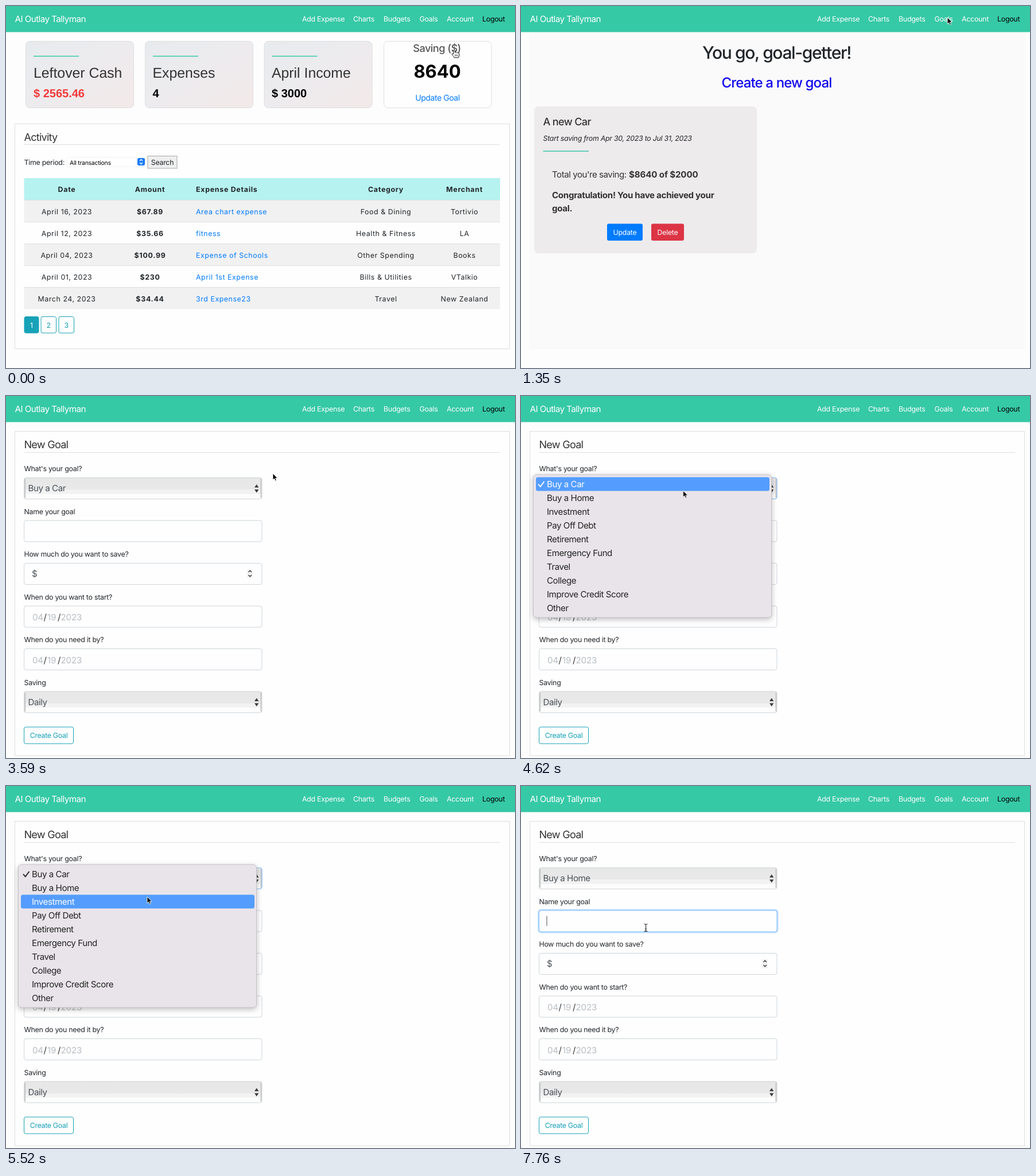
These frames come from a looping animation (887x631 px, 8000 ms). An HTML page:

```html
<!DOCTYPE html>
<html lang="en">
<head>
<meta charset="utf-8">
<title>Expense dashboard</title>
<style>
html, body { margin: 0; width: 100%; height: 100%; overflow: hidden; background: #fdfdfd; }
svg { display: block; width: 887px; height: 631px; }
text {
  font: 12.4px Inter, "Noto Sans", sans-serif; font-optical-sizing: none;
  letter-spacing: -.022em; fill: #212529; text-rendering: geometricPrecision; white-space: pre;
}
.m { text-anchor: middle; }
.white text, text.white { fill: #fff; }
text.brand { font-size: 15.2px; letter-spacing: -.036em; }
text.head { font-size: 18.1px; letter-spacing: -.042em; fill: #333; }
text.title { font-size: 30px; font-weight: 500; letter-spacing: -.045em; }
text.link { font-size: 24px; font-weight: 500; letter-spacing: -.036em; fill: #1106ee; }
text.big { font: 24.8px "Liberation Sans", Arial, sans-serif; letter-spacing: 0; fill: #333; }
text.sum { font: bold 20px "Liberation Sans", Arial, sans-serif; letter-spacing: 0; fill: #000; }
.table text { letter-spacing: .55px; }
.table .b { font-weight: 700; letter-spacing: .72px; }
.table .a { fill: #007bff; }
text.teal { fill: #17a2b8; }
text.lead { font-size: 15.1px; letter-spacing: -.031em; fill: #333; }
text.strong { font-weight: 700; letter-spacing: -.02em; }
.field { fill: #fefefe; stroke: #ced4da; }
.pick text { font-size: 15.1px; letter-spacing: -.029em; fill: #495057; }
text.date { font-size: 15.1px; letter-spacing: -.01em; fill: #b8bdc3; }
.date .s { fill: #333; }
.menu text { font-size: 15.1px; letter-spacing: -.029em; fill: #222; }
.menu .lit text { fill: #fff; }
.menu .lit rect { fill: #549dfe; }
.panel { fill: #fefefe; stroke: #dedede; }
.rule { stroke: #dedfe0; }
.mark { stroke: #34c9a5; stroke-width: 1.6; }

/* One 8 s timeline shared by every part */
.t { opacity: 0; animation: 8s step-end -2ms infinite; }
.home { animation-name: home; }
.goals { animation-name: goals; }
.form { animation-name: form; }
.back { animation-name: back; }
.front { animation-name: front; }
.under { animation-name: under; }
.focus { animation-name: focus; }
.menu { animation-name: menu; }
.car { animation-name: car; }
.house { animation-name: house; }
.invest { animation-name: invest; }
.before { animation-name: before; }
.after { animation-name: after; }
.ring { animation-name: ring; }
.arrow { animation-name: arrow; }
.hand { animation-name: hand; }
.beam { animation-name: beam; }
@keyframes home { 0% { opacity: 1 } 16.875%, to { opacity: 0 } }
@keyframes goals { 0% { opacity: 0 } 16.875% { opacity: 1 } 44.875%, to { opacity: 0 } }
@keyframes form { 0% { opacity: 0 } 44.875%, to { opacity: 1 } }
@keyframes back { 0% { opacity: 1 } 3.75% { opacity: .5 } 5.625%, to { opacity: 0 } }
@keyframes front { 0% { opacity: 0 } 3.75% { opacity: .5 } 5.625%, to { opacity: 1 } }
@keyframes under { 0% { opacity: 0 } 41.125%, to { opacity: 1 } }
@keyframes focus { 0% { opacity: 0 } 55.9375% { opacity: 1 } 95.125%, to { opacity: 0 } }
@keyframes menu { 0% { opacity: 0 } 55.9375% { opacity: 1 } 80.25% { opacity: .58 } 82.125% { opacity: .2 } 84%, to { opacity: 0 } }
@keyframes car { 0% { opacity: 0 } 55.9375% { opacity: 1 } 59.625%, to { opacity: 0 } }
@keyframes house { 0% { opacity: 0 } 59.625% { opacity: 1 } 65.25% { opacity: 0 } 70.875%, to { opacity: 1 } }
@keyframes invest { 0% { opacity: 0 } 65.25% { opacity: 1 } 70.875%, to { opacity: 0 } }
@keyframes before { 0% { opacity: 1 } 82.125%, to { opacity: 0 } }
@keyframes after { 0% { opacity: 0 } 82.125%, to { opacity: 1 } }
@keyframes ring { 0% { opacity: 0 } 95.125% { opacity: .6 } 97%, to { opacity: 1 } }
@keyframes hand { 0% { opacity: 1 } 3.75% { opacity: 0 } 7.5% { opacity: 1 } 16.875% { opacity: 0 } 41.125% { opacity: 1 } 44.875%, to { opacity: 0 } }
@keyframes arrow { 0% { opacity: 0 } 3.75% { opacity: 1 } 7.5% { opacity: 0 } 16.875% { opacity: 1 } 41.125% { opacity: 0 } 44.875% { opacity: 1 } 85.8125%, to { opacity: 0 } }
@keyframes beam { 0% { opacity: 0 } 85.8125%, to { opacity: 1 } }

.pointer { animation: move 8s step-end -2ms infinite; }
@keyframes move {
  0% { transform: translate(781px, 76px); animation-timing-function: steps(5) }
  9.375% { transform: translate(743px, 20px) }
  20.625% { transform: translate(743px, 20px); animation-timing-function: steps(3) }
  26.25% { transform: translate(428px, 431px) }
  30% { transform: translate(428px, 431px); animation-timing-function: steps(3) }
  35.5625% { transform: translate(450px, 205px); animation-timing-function: steps(3) }
  41.125% { transform: translate(465px, 135px) }
  48.5125% { transform: translate(465px, 135px); animation-timing-function: steps(4) }
  55.9375% { transform: translate(290px, 158px); animation-timing-function: steps(2) }
  59.625% { transform: translate(275px, 172px); animation-timing-function: steps(2) }
  63.375% { transform: translate(262px, 184px); animation-timing-function: steps(2) }
  67.125% { transform: translate(250px, 197px); animation-timing-function: steps(2) }
  70.875% { transform: translate(242px, 189px) }
  80.25% { transform: translate(242px, 189px); animation-timing-function: steps(6) }
  91.375%, to { transform: translate(217.5px, 247px) }
}
</style>
</head>
<body>
<svg viewBox="0 0 887 631" xmlns="http://www.w3.org/2000/svg">
<defs>
  <linearGradient id="tint" x1="0" y1="0" x2="1" y2="1">
    <stop stop-color="#e7ebee"/><stop offset=".5" stop-color="#edebee"/><stop offset="1" stop-color="#f3e9e9"/>
  </linearGradient>
  <linearGradient id="gloss" x1="0" y1="0" x2="0" y2="1">
    <stop stop-color="#e7e7e7"/><stop offset=".56" stop-color="#e9e9e9"/>
    <stop offset=".56" stop-color="#f2f2f2"/><stop offset=".77" stop-color="#f2f2f2"/>
    <stop offset=".77" stop-color="#fdfdfd"/>
  </linearGradient>
  <g id="card">
    <rect width="188" height="116" rx="7" fill="url(#tint)" stroke="#dcdee0"/>
    <path class="mark" d="M13.5 26h79"/>
  </g>
  <rect id="box" class="field" x="31.5" width="414.5" height="37" rx="3.5"/>
  <g id="select">
    <rect x="31.5" width="414.5" height="37" rx="3.5" fill="url(#gloss)" stroke="#ced4da"/>
    <path d="M33.2 2v33M444.4 2v33" stroke="#c4c4c4" stroke-width="1.8"/>
    <path d="M433 17l3.7-5.5 3.7 5.5zM433 20.500l3.700 5.500 3.700-5.500z" fill="#3c3c3c"/>
  </g>
</defs>

<rect width="887" height="631" fill="#fdfdfd"/>

<g class="t home">
  <use href="#card" x="34.5" y="61.5"/><use href="#card" x="242.5" y="61.5"/><use href="#card" x="450" y="61.5"/>
  <text class="big" x="48" y="124.500">Leftover Cash</text>
  <text class="big" x="255.500" y="124.500">Expenses</text>
  <text class="big" x="463" y="124.500">April Income</text>
  <text class="sum" x="48" y="159" style="fill:#f23b3b">$ 2565.46</text>
  <text class="sum" x="255.500" y="159">4</text>
  <text class="sum" x="463" y="159">$ 3000</text>
  <g class="t front">
    <use href="#card" x="658" y="61.5"/>
    <text class="big" x="671" y="124.500">Saving ($)</text>
    <text class="sum" x="671" y="159">8640</text>
  </g>
  <g class="t back">
    <rect x="658.500" y="61.500" width="187.500" height="116" rx="7" fill="#fefefe" stroke="#dfdfdf"/>
    <text class="head m" x="751" y="80" style="fill:#555;font-weight:500;letter-spacing:-.028em">Saving ($)</text>
    <text class="m" x="751.500" y="125" style="font-size:31px;font-weight:700;letter-spacing:0;fill:#000">8640</text>
    <text class="m" x="752" y="164.800" style="font-size:14px;letter-spacing:-.03em;fill:#007bff">Update Goal</text>
  </g>

  <rect class="panel" x="15.500" y="205.500" width="862" height="392"/>
  <text class="head" x="31.500" y="234.500">Activity</text>
  <path class="rule" d="M31.500 241.500H861"/>
  <text x="31.500" y="276.500">Time period:</text>
  <rect x="106" y="264" width="136" height="16" rx="3" fill="#fff" stroke="#eee" stroke-width=".8"/>
  <text x="111" y="276.500" style="font-size:10.4px;fill:#000">All transactions</text>
  <rect x="229" y="265" width="13" height="13" rx="3" fill="#1a7bf5"/>
  <path d="M233 270l2.500-2.500 2.500 2.500M233 273l2.500 2.500 2.500-2.500" fill="none" stroke="#fff" stroke-width="1.300"/>
  <rect x="247" y="261.500" width="51" height="21.500" fill="#efefef" stroke="#a9a9a9"/>
  <text class="m" x="272.500" y="276.500">Search</text>

  <rect x="31.500" y="300" width="829.500" height="38.500" fill="#b6f2f0"/>
  <path d="M31.500 338.500h829.500v38h-829.500zm0 76h829.500v38h-829.500zm0 76h829.500v38h-829.500z" fill="#f1f1f1"/>
  <path class="rule" d="M31.500 338.500H861M31.500 376.500H861M31.500 414.500H861M31.500 452.500H861M31.500 490.500H861"/>
  <g class="table">
    <g transform="translate(0 324)">
      <text class="b m" x="106">Date</text><text class="b m" x="251">Amount</text><text class="b" x="331">Expense Details</text>
      <text class="b m" x="662">Category</text><text class="b m" x="799">Merchant</text>
    </g>
    <g transform="translate(0 362.500)">
      <text class="m" x="106">April 16, 2023</text><text class="b m" x="251">$67.89</text><text class="a" x="331">Area chart expense</text>
      <text class="m" x="662">Food &amp; Dining</text><text class="m" x="799">Tortivio</text>
    </g>
    <g transform="translate(0 400.500)">
      <text class="m" x="106">April 12, 2023</text><text class="b m" x="251">$35.66</text><text class="a" x="331">fitness</text>
      <text class="m" x="662">Health &amp; Fitness</text><text class="m" x="799">LA</text>
    </g>
    <g transform="translate(0 438.500)">
      <text class="m" x="106">April 04, 2023</text><text class="b m" x="251">$100.99</text><text class="a" x="331">Expense of Schools</text>
      <text class="m" x="662">Other Spending</text><text class="m" x="799">Books</text>
    </g>
    <g transform="translate(0 476.500)">
      <text class="m" x="106">April 01, 2023</text><text class="b m" x="251">$230</text><text class="a" x="331">April 1st Expense</text>
      <text class="m" x="662">Bills &amp; Utilities</text><text class="m" x="799">VTalkio</text>
    </g>
    <g transform="translate(0 514.500)">
      <text class="m" x="106">March 24, 2023</text><text class="b m" x="251">$34.44</text><text class="a" x="331">3rd Expense23</text>
      <text class="m" x="662">Travel</text><text class="m" x="799">New Zealand</text>
    </g>
  </g>
  <g fill="#fefefe" stroke="#17a2b8">
    <rect x="32" y="541.500" width="25" height="28.500" rx="3" fill="#17a2b8"/>
    <rect x="61" y="541.500" width="26.500" height="28.500" rx="3"/>
    <rect x="92" y="541.500" width="26.500" height="28.500" rx="3"/>
  </g>
  <text class="m white" x="44.500" y="560.500">1</text>
  <text class="m teal" x="74.200" y="560.500">2</text>
  <text class="m teal" x="105.200" y="560.500">3</text>
</g>

<g class="t goals">
  <rect x="14.500" y="45" width="864" height="553" fill="#fafafa"/>
  <text class="title m" x="445.500" y="91.500">You go, goal-getter!</text>
  <text class="link m" x="445.500" y="142">Create a new goal</text>
  <text class="link m t under" x="445.500" y="142" text-decoration="underline">Create a new goal</text>
  <rect x="23" y="175" width="388" height="256" rx="7.500" fill="#eeebec"/>
  <text class="head" x="38.500" y="208" style="font-weight:500;letter-spacing:-.037em">A new Car</text>
  <text x="38.500" y="235" font-style="italic" style="font-style:italic">Start saving from Apr 30, 2023 to Jul 31, 2023</text>
  <path class="mark" d="M38.500 253H118"/>
  <text class="lead" x="54" y="299">Total you're saving:</text>
  <text class="lead strong" x="188" y="299" style="letter-spacing:-.008em">$8640 of $2000</text>
  <text class="lead strong" x="54" y="334.500">Congratulation! You have achieved your</text>
  <text class="lead strong" x="54" y="358">goal.</text>
  <rect x="150" y="379.500" width="62" height="29.500" rx="3" fill="#007bff"/>
  <rect x="227" y="379.500" width="57" height="29.500" rx="3" fill="#dc3545"/>
  <text class="m white" x="181" y="399">Update</text>
  <text class="m white" x="255.500" y="399">Delete</text>
</g>

<g class="t form">
  <rect class="panel" x="15.500" y="61.500" width="862" height="565.500"/>
  <text class="head" x="31.500" y="91">New Goal</text>
  <path class="rule" d="M31.500 98.500H861"/>
  <text x="31.500" y="131">What's your goal?</text>
  <text x="31.500" y="205.700">Name your goal</text>
  <text x="31.500" y="280.300">How much do you want to save?</text>
  <text x="31.500" y="354.800">When do you want to start?</text>
  <text x="31.500" y="429.400">When do you need it by?</text>
  <text x="31.500" y="503.900">Saving</text>
  <use href="#select" y="142.500"/><use href="#box" y="217"/><use href="#box" y="291.500"/>
  <use href="#box" y="366"/><use href="#box" y="440.500"/><use href="#select" y="515"/>
  <g class="pick">
    <text class="t before" x="38.500" y="166">Buy a Car</text>
    <text class="t after" x="38.500" y="166">Buy a Home</text>
    <text x="45" y="315">$</text>
    <text x="38.500" y="539">Daily</text>
  </g>
  <rect x="420" y="302" width="10" height="15.500" rx="2" fill="#f1f1f1"/>
  <path d="M422.500 307l2.700-2.700 2.700 2.700M422.500 312l2.700 2.700 2.700-2.700" fill="none" stroke="#333" stroke-width="1.400"/>
  <text class="date" y="391"><tspan x="46">04</tspan><tspan class="s" x="65.500">/</tspan><tspan x="72">19</tspan><tspan class="s" x="90">/</tspan><tspan x="95.500">2023</tspan></text>
  <text class="date" y="465.500"><tspan x="46">04</tspan><tspan class="s" x="65.500">/</tspan><tspan x="72">19</tspan><tspan class="s" x="90">/</tspan><tspan x="95.500">2023</tspan></text>
  <rect x="31.500" y="577" width="86" height="29" rx="3" fill="#fefefe" stroke="#17a2b8"/>
  <text class="m teal" x="74.500" y="596" style="letter-spacing:-.026em">Create Goal</text>

  <rect class="t focus" x="31.500" y="142.500" width="414.500" height="37" rx="3.500" fill="none" stroke="#80bdff"/>
  <g class="t ring">
    <rect x="30.500" y="216" width="416.500" height="39" rx="4.500" fill="none" stroke="#bfdeff" stroke-width="3"/>
    <rect x="31.500" y="217" width="414.500" height="37" rx="3.500" fill="#fefefe" stroke="#80bdff"/>
    <path d="M45 226.500v17.500" stroke="#495057"/>
  </g>

  <g class="t menu">
    <rect x="21.500" y="137" width="415" height="249" rx="5.500" fill="#e9e4ea" stroke="#c6c2c8" style="filter:drop-shadow(0 3px 5px rgba(0,0,0,.25))"/>
    <path d="M30 153.500l3.700 4.500 6.800-9" fill="none" stroke="#222" stroke-width="1.900"/>
    <text x="45" y="158.500">Buy a Car</text>
    <text x="45" y="182.500">Buy a Home</text>
    <text x="45" y="206.500">Investment</text>
    <text x="45" y="230.500">Pay Off Debt</text>
    <text x="45" y="254.500">Retirement</text>
    <text x="45" y="278.500">Emergency Fund</text>
    <text x="45" y="302.500">Travel</text>
    <text x="45" y="326.500">College</text>
    <text x="45" y="350.500">Improve Credit Score</text>
    <text x="45" y="374.500">Other</text>
    <g class="lit t car">
      <rect x="26" y="141.500" width="407" height="24" rx="3.500"/><text x="45" y="158.500">Buy a Car</text>
      <path d="M30 153.500l3.700 4.500 6.800-9" fill="none" stroke="#fff" stroke-width="1.900"/>
    </g>
    <g class="lit t house"><rect x="26" y="165.500" width="407" height="24" rx="3.500"/><text x="45" y="182.500">Buy a Home</text></g>
    <g class="lit t invest"><rect x="26" y="189.500" width="407" height="24" rx="3.500"/><text x="45" y="206.500">Investment</text></g>
  </g>
</g>

<rect width="887" height="45.500" fill="#36c9a6"/>
<g class="white">
  <text class="brand" x="15.500" y="28">AI Outlay Tallyman</text>
  <text x="516" y="27">Add Expense</text>
  <text x="605" y="27">Charts</text>
  <text x="658" y="27">Budgets</text>
  <text x="720.500" y="27">Goals</text>
  <text x="768" y="27">Account</text>
</g>
<text x="830" y="27" style="fill:#000">Logout</text>

<g class="pointer">
  <path class="t arrow" d="M0 0V11.300l2.600-2.400 1.700 4 2-.8-1.700-3.900h3.500z" fill="#000" stroke="#fff" stroke-width=".9"/>
  <g class="t hand" stroke="#111" stroke-linejoin="round">
    <path d="M-1.300 1.200C-1.100-.3 1-.3 1.200 1.200V5C2.400 4.300 3.900 4.500 4.200 5.400 5.400 4.800 6.500 5.300 6.800 6.100 8.200 5.800 8.800 6.600 8.800 7.800V10C8.600 11.800 7.600 12.300 7.400 14H.2C-.6 12-2.600 10.300-3.900 8.300-4.300 7.200-3 6.600-2.100 7.300L-1.300 8.200Z" fill="#fff"/>
    <path d="M1.700 8.500v3M3.700 8.500v3M5.700 8.500v3" stroke-width=".8"/>
  </g>
  <path class="t beam" d="M-3-6.500q2.500 0 3 1.200q.5-1.200 3-1.200M0-5.300V5.300M-3 6.500q2.500 0 3-1.200q.5 1.200 3 1.200M-1.500 2h3" fill="none" stroke="#222" stroke-width="1.200"/>
</g>
</svg>
</body>
</html>
```
